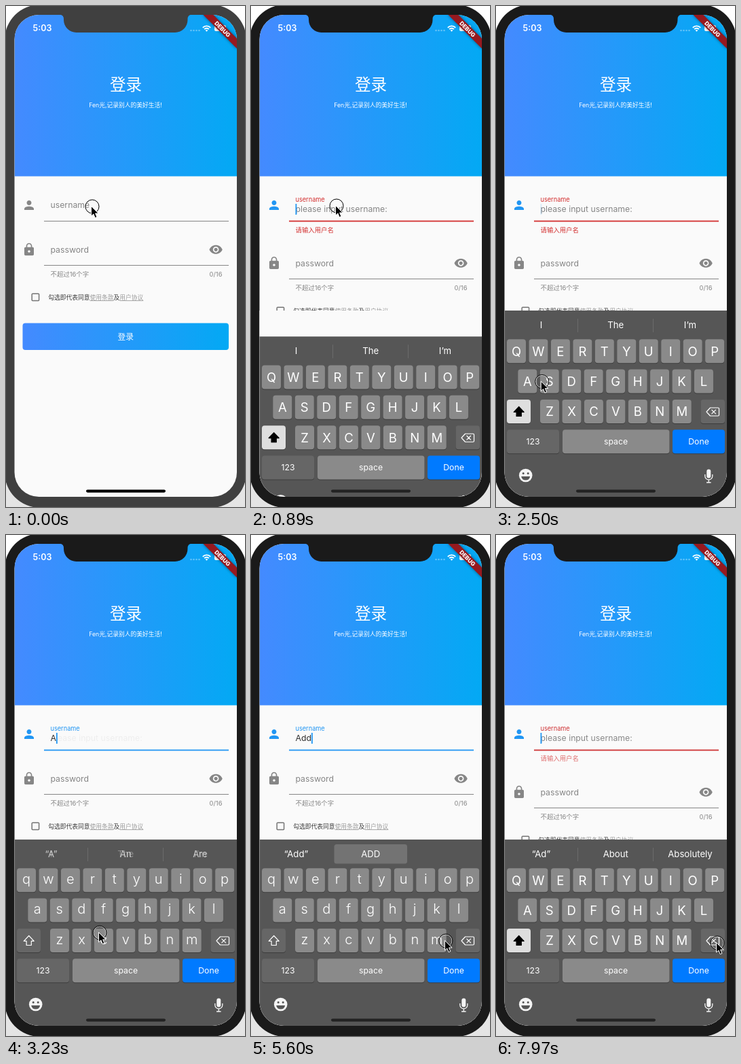
Animation, 352 px wide and 737 px high, one loop 8 s. Source, as an HTML page:

```html
<!DOCTYPE html>
<html lang="zh-CN">
<head>
<meta charset="utf-8">
<style>
  html, body { margin: 0; width: 100%; height: 100%; overflow: hidden; background: #fff; }
  svg { display: block; width: 352px; height: 737px; }
  text { font: 12.25px Inter, "Noto Sans CJK SC", "Noto Sans CJK", sans-serif; white-space: pre; }
  .mid { text-anchor: middle; }
  .white, .kb text { fill: #fff; }
  .gray { fill: #868686; }
  .small { font-size: 9.4px; }
  .tiny { font-size: 8.75px; }
  .tip { font-size: 13.2px; }
</style>
</head>
<body>
<svg viewBox="0 0 352 737">
  <defs>
    <linearGradient id="blue"><stop stop-color="#448aff"/><stop offset="1" stop-color="#03a9f4"/></linearGradient>
    <linearGradient id="desk" x2="0" y2="1"><stop stop-color="#fff"/><stop offset="1" stop-color="#e4e4e4"/></linearGradient>
    <clipPath id="screen"><rect x="12.5" y="13" width="327.5" height="709" rx="36"/></clipPath>
    <filter id="blur" x="-20%" y="-60%" width="140%" height="220%"><feGaussianBlur stdDeviation="2.2"/></filter>
  </defs>
  <rect width="352" height="737" fill="url(#desk)"/>
  <rect class="bezel" x="-2" y="-2" width="356" height="740" rx="52"/>

  <g clip-path="url(#screen)">
    <rect y="13" width="352" height="710" fill="#fafafa"/>
    <rect x="12.5" y="13" width="327.5" height="237.5" fill="url(#blue)"/>
    <g class="white">
      <text x="176.5" y="124" class="mid white" style="font-size:23.6px">登录</text>
      <text x="176" y="149.3" class="mid white tiny">Fen光,记录别人的美好生活!</text>
      <text x="39.5" y="37.3" class="white" style="font-size:12.5px;font-weight:600">5:03</text>
      <g opacity=".35"><circle cx="272.5" cy="36" r="1.3"/><circle cx="276.5" cy="36" r="1.3"/><circle cx="280.5" cy="36" r="1.3"/><circle cx="284.5" cy="36" r="1.3"/></g>
      <path d="M289.8 31.8a8 8 0 0 1 11.4 0M292.1 34.2a4.8 4.8 0 0 1 6.8 0" fill="none" stroke="#fff" stroke-width="1.9"/>
      <path d="M293.6 35.8q1.9-1.6 3.8 0l-1.9 2z"/>
      <rect x="307" y="28" width="17" height="9" rx="2.5"/>
    </g>

    <path id="person" transform="translate(23.5 282.5) scale(.875)" d="M12 12c2.2 0 4-1.8 4-4s-1.8-4-4-4-4 1.8-4 4 1.8 4 4 4zm0 2c-2.7 0-8 1.3-8 4v2h16v-2c0-2.7-5.3-4-8-4z"/>
    <text id="label" x="65.5">username</text>
    <text id="hint" x="65.5" y="303.3" class="gray">please input username:</text>
    <text id="typed" x="65.5" y="303.3" fill="#303030"></text>
    <rect id="caret" y="291" width="1.8" height="16" fill="#2196f3"/>
    <rect id="line" x="56" width="272"/>
    <text id="error" x="65.5" class="small" fill="#d32f2f">请输入用户名</text>

    <g id="lower">
      <g class="gray" fill-rule="evenodd">
        <path transform="translate(23.5 347.8) scale(.875)" d="M18 8h-1V6c0-2.8-2.2-5-5-5S7 3.2 7 6v2H6c-1.1 0-2 .9-2 2v10c0 1.1.9 2 2 2h12c1.1 0 2-.9 2-2V10c0-1.1-.9-2-2-2zm-6 9c-1.1 0-2-.9-2-2s.9-2 2-2 2 .9 2 2-.9 2-2 2zm3.1-9H8.9V6c0-1.7 1.4-3.1 3.1-3.1s3.1 1.4 3.1 3.1v2z"/>
        <path transform="translate(298.6 347.8) scale(.875)" d="M12 4.5C7 4.5 2.7 7.6 1 12c1.7 4.4 6 7.5 11 7.5s9.3-3.1 11-7.5c-1.7-4.4-6-7.5-11-7.5zM12 17c-2.8 0-5-2.2-5-5s2.2-5 5-5 5 2.2 5 5-2.2 5-5 5zm0-8c-1.7 0-3 1.3-3 3s1.3 3 3 3 3-1.3 3-3-1.3-3-3-3z"/>
        <rect x="56" y="381" width="272" height="1"/>
        <text x="65.5" y="362.8" class="gray">password</text>
        <text x="65.5" y="398.3" class="gray small">不超过16个字</text>
        <text x="318.5" y="398" class="gray small" text-anchor="end">0/16</text>
      </g>
      <rect x="38.2" y="423.2" width="10.4" height="10.4" rx="1" fill="none" stroke="#757575" stroke-width="1.5"/>
      <text x="62.3" y="432" class="tiny" fill="#3a3a3a">勾选即代表同意<tspan class="link">使用条款</tspan>及<tspan class="link">用户协议</tspan></text>
    </g>
    <rect x="24.5" y="466.5" width="303.5" height="39.5" rx="4" fill="url(#blue)"/>
    <text x="176.3" y="490.6" class="mid white" style="font-size:11.8px">登录</text>

    <rect id="cover" y="448" width="352" height="290" fill="#fafafa"/>
    <g id="kb" class="kb"></g>
    <rect id="home" x="118" y="711.5" width="117" height="4.2" rx="2.1"/>

    <g transform="translate(340 13) rotate(45)">
      <rect x="-35" y="24.5" width="70" height="10.5" opacity=".5" filter="url(#blur)"/>
      <rect x="-35" y="24.5" width="70" height="10.5" fill="#96191f"/>
      <text y="32.9" class="mid white" style="font-size:8.4px;font-weight:800">DEBUG</text>
    </g>
  </g>
  <path class="bezel" d="M79 12.5q6 .5 6 7v1a18.500 18.500 0 0 0 18.500 18.500h145.500a18.500 18.500 0 0 0 18.500-18.500v-1q0-6.500 6-7z"/>
  <g id="cursor">
    <circle r="9.2" fill="none" stroke="#fff" stroke-opacity=".8"/>
    <circle r="10" fill="none" stroke="#000"/>
    <path d="M-1.500-.5v14.500l3.400-3 2.300 5.600 2.700-1.100-2.300-5.400h4.600z" stroke="#fff" stroke-width="1"/>
  </g>
</svg>
<script>
const $ = id => document.getElementById(id);
const set = (el, attrs) => { for (const k in attrs) el.setAttribute(k, attrs[k]); };
const clamp = x => Math.min(1, Math.max(0, x));
const ramp = (t, start, len) => clamp((t - start) / len);
const smooth = x => x * x * (3 - 2 * x);
const easeOut = x => 1 - (1 - x) ** 3;
const mix = (a, b, k) => a.map((v, i) => v + (b[i] - v) * k);
const rgb = c => `rgb(${c.map(Math.round)})`;

const LOOP = 8000, TICK = 147.4;
const FOCUS = 680, FIRST = 3040, CLEARED = 7820;
const GRAY = [134, 134, 134], BLUE = [33, 150, 243], RED = [211, 47, 47];

const typing = [[0, ''], [FIRST, 'A'], [3600, 'Ad'], [5040, 'Add'], [7330, 'Ad'], [7600, 'A'], [CLEARED, '']];
// time, three suggestions, whether the middle one is highlighted
const tips = [
  [0, ['I', 'The', 'I’m'], 0],
  [FIRST, ['“A”', 'An', 'Are'], 0],
  [3600, ['“Ad”', 'An', 'About'], 1],
  [5040, ['“Add”', 'ADD', ''], 1],
  [7330, ['“Ad”', 'About', 'Absolutely'], 0]
];
const path = [
  [0, 127, 295], [200, 127, 295], [290, 126, 294], [884, 126, 294], [1474, 133, 527],
  [1950, 195, 540], [2650, 52, 554], [3000, 52, 554], [3243, 138, 585], [3550, 209, 598],
  [3950, 209, 597], [4422, 130, 597], [4800, 144, 597], [5150, 144, 597], [5800, 328, 597],
  [6250, 300, 530], [6780, 203, 401], [7250, 326, 598], [7960, 326, 600]
];
const lastIndex = (list, t) => list.reduce((n, p, i) => p[0] <= t ? i : n, 0);

function key(x, y, w, fill, id = '') {
  return `<rect x="${x}" y="${y + 1}" width="${w}" height="35" rx="4" fill="#3c3c3c"/>
    <rect ${id} x="${x}" y="${y}" width="${w}" height="35" rx="4" fill="${fill}"/>`;
}
const caption = (x, s) => `<text x="${x}" y="645" class="mid">${s}</text>`;
const tipRow = id => `<g id="${id}">` + [66.5, 176.3, 286].map(x =>
  `<text x="${x}" y="474" class="mid tip"></text>`).join('') + '</g>';

function buildKeyboard() {
  let html = `<rect y="448" width="352" height="290" fill="#565656"/>
    <path id="bars" d="M120.500 460v20M231.500 460v20" stroke="#6b6b6b"/>
    <rect id="glow" x="122.500" y="455" width="107.500" height="28.500" rx="3.500" fill="#737373"/>`
    + tipRow('tipsOld') + tipRow('tipsNew');
  [['QWERTYUIOP', 30], ['ASDFGHJKL', 46.3], ['ZXCVBNM', 79]].forEach(([row, x0], r) => {
    [...row].forEach((ch, i) => {
      const x = x0 + i * 32.46, y = 490.3 + r * 44.3;
      html += key(x - 14, y, 28, '#8a8a8a')
        + `<text class="mid letter" data-y="${y}" x="${x}">${ch}</text>`;
    });
  });
  html += key(16, 578.9, 35, '#666', 'id="shift"') + key(301.5, 578.9, 35.5, '#666')
    + key(16, 623.2, 77, '#666') + key(98, 623.2, 157.5, '#8a8a8a') + key(260, 623.2, 77, '#007aff')
    + caption(54.5, '123') + caption(176.5, 'space') + caption(298.5, 'Done')
    + `<path id="arrow" d="M33.700 589.500l7.500 7.800h-3.900v6.200h-7.200v-6.200h-3.900z" stroke-width="1.200" stroke-linejoin="round"/>
    <path d="M310 597l5.500-6h11.500q1.500 0 1.500 1.500v9q0 1.500-1.500 1.500h-11.500zM317.500 593.800l6.400 6.400M323.900 593.800l-6.400 6.400" fill="none" stroke="#fff" stroke-width="1.200" stroke-linejoin="round"/>
    <circle cx="43.700" cy="690.500" r="9.800" fill="#f4f4f4"/>
    <g fill="#565656"><circle cx="40.200" cy="687.500" r="1.500"/><circle cx="47.200" cy="687.500" r="1.500"/>
    <path d="M37.200 692h13q-1 5.500-6.500 5.500t-6.500-5.500z"/></g>
    <rect x="310.300" y="681.500" width="6" height="13" rx="3" fill="#f4f4f4"/>
    <path d="M307.800 689v2.500a5.500 5.500 0 0 0 11 0v-2.500M313.300 697v3.500M310 701h6.600" fill="none" stroke="#f4f4f4" stroke-width="1.300"/>`;
  $('kb').innerHTML = html;
}

function drawTips(t) {
  const i = lastIndex(tips, t), now = tips[i], old = tips[Math.max(0, i - 1)];
  const k = i ? ramp(t, now[0] + 100, 150) : 1;
  [['tipsOld', old, 1 - k], ['tipsNew', now, k]].forEach(([id, row, alpha]) => {
    [...$(id).children].forEach((el, n) => el.textContent = row[1][n]);
    set($(id), { opacity: alpha });
  });
  const glow = old[2] + (now[2] - old[2]) * k;
  set($('glow'), { opacity: glow });
  set($('bars'), { opacity: 1 - glow });
}

function drawKeyboard(t, upper) {
  const w = 0.0183 * Math.max(0, t - 695);
  set($('kb'), { transform: `translate(0 ${274 * (1 + w) * Math.exp(-w)})` });
  document.querySelectorAll('.letter').forEach(el => {
    el.textContent = upper ? el.textContent.toUpperCase() : el.textContent.toLowerCase();
    set(el, { y: +el.dataset.y + (upper ? 24.4 : 22.8) });
    el.style.fontSize = upper ? '18.5px' : '20px';
    el.style.fontWeight = upper ? 400 : 300;
  });
  set($('shift'), { fill: upper ? '#dedede' : '#666' });
  set($('arrow'), { fill: upper ? '#000' : 'none', stroke: upper ? '#000' : '#fff' });
}

function caretAlpha(t, since) {
  const wait = t - since - 150;
  if (wait < 500) return 1;
  const u = wait % 1000;
  return u < 500 ? easeOut(u / 250 > 1 ? 1 : u / 250) : (1 - ramp(u, 500, 250)) ** 1.6;
}

function drawField(t, value, since) {
  const focused = t >= FOCUS, float = smooth(ramp(t, FOCUS, 200));
  const err = ramp(t, FOCUS, 200) - ramp(t, FIRST, 200) + ramp(t, CLEARED, 200);
  const hint = ramp(t, FOCUS, 200) - ramp(t, FIRST, 225) + easeOut(ramp(t, CLEARED, 200));
  const color = rgb(mix(mix(GRAY, BLUE, float), RED, easeOut(err)));
  const thick = focused ? 1.8 : 1;

  set($('person'), { fill: rgb(focused ? BLUE : GRAY) });
  set($('label'), { y: 297.3 - 9.2 * float, fill: color });
  $('label').style.fontSize = 12.25 - 3.06 * float + 'px';
  set($('hint'), { opacity: hint });
  set($('line'), { y: 316.5 - thick / 2, height: thick, fill: color });
  set($('error'), { y: 329 + 3.6 * err, opacity: err });
  set($('lower'), { transform: `translate(0 ${err > 0.02 ? 20 : 0})` });

  $('typed').textContent = value;
  set($('caret'), {
    x: 65.5 + (value ? $('typed').getComputedTextLength() : 0),
    opacity: focused ? caretAlpha(t, Math.max(FOCUS, since)) : 0
  });
}

function drawCursor(t) {
  const i = lastIndex(path, t), a = path[i], b = path[i + 1] || a;
  const p = mix(a, b, smooth(ramp(t, a[0], b[0] - a[0] || 1)));
  set($('cursor'), { transform: `translate(${p[1]} ${p[2]})` });
}

function draw(t) {
  const [since, value] = typing[lastIndex(typing, t)];
  const covered = t >= 695;
  document.querySelectorAll('.bezel').forEach(el => set(el, { fill: t < 560 ? '#404040' : '#1a1a1a' }));
  set($('cover'), { visibility: covered ? 'visible' : 'hidden' });
  set($('home'), { fill: covered ? '#222' : '#000' });
  drawField(t, value, since);
  drawKeyboard(t, !value);
  drawTips(t);
  drawCursor(t);
}

buildKeyboard();
document.querySelectorAll('.link').forEach(el => set(el, { fill: '#9e9e9e', 'text-decoration': 'underline' }));

let shown = -1;
function frame(now) {
  const step = Math.floor((now % LOOP + 15) / TICK);
  if (step !== shown) draw((shown = step) * TICK);
  requestAnimationFrame(frame);
}
draw(0);
requestAnimationFrame(frame);
</script>
</body>
</html>
```
